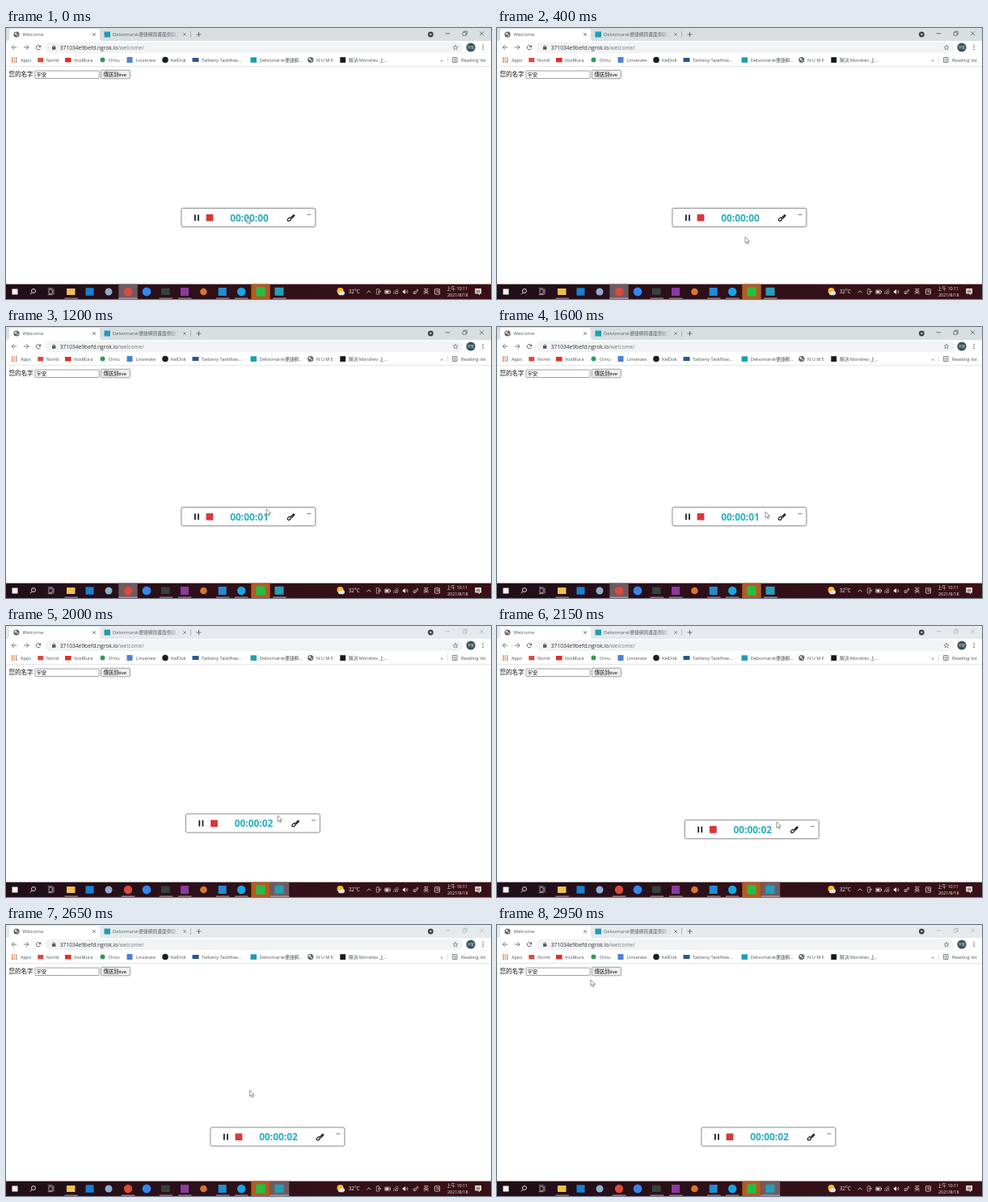
These frames come from a looping animation (600x336 px, 3 s). An HTML page with a canvas:

```html
<!DOCTYPE html>
<html lang="zh-Hant">
<head>
<meta charset="utf-8">
<title>Welcome</title>
<style>
html, body { margin: 0; width: 100%; height: 100%; overflow: hidden; background: #fff; }
canvas { display: block; width: 600px; height: 336px; }
</style>
</head>
<body>
<canvas id="stage"></canvas>
<script>
const W = 600, H = 336, LOOP = 3000, STEP = 50;
const FOCUS_SHIFT = 1750, DRAG_END = 2500;
const UI = '"Open Sans", "Noto Sans CJK TC", "Noto Sans CJK JP", sans-serif';
const CJK = '"Noto Sans CJK TC", "Noto Sans CJK JP", "Noto Sans", sans-serif';
const FORM = '"Liberation Sans", "Noto Sans CJK TC", "Noto Sans CJK JP", sans-serif';

const canvas = document.getElementById('stage');
const dpr = window.devicePixelRatio || 1;
canvas.width = W * dpr;
canvas.height = H * dpr;
const c = canvas.getContext('2d');

// Pointer path: time, x, y
const path = [
  [0, 298, 234.5], [400, 307, 259], [800, 312, 222], [1600, 332, 229],
  [FOCUS_SHIFT, 330.5, 225.5], [2000, 336, 235], [2350, 361, 254.5],
  [DRAG_END, 366.5, 253], [2950, 116, 68]
];

function pointer(t) {
  const i = path.findIndex(p => p[0] >= t);
  if (i < 0) return path[path.length - 1].slice(1);
  if (i === 0) return path[0].slice(1);
  const [t0, x0, y0] = path[i - 1], [t1, x1, y1] = path[i];
  const u = (t - t0) / (t1 - t0), k = u * u * (3 - 2 * u);
  return [x0 + (x1 - x0) * k, y0 + (y1 - y0) * k];
}

function origin(x, y) {
  c.setTransform(dpr, 0, 0, dpr, x * dpr, y * dpr);
}

function box(x, y, w, h, fill) {
  c.fillStyle = fill;
  c.fillRect(x, y, w, h);
}

function outline(color, lw) {
  c.strokeStyle = color;
  c.lineWidth = lw;
  c.stroke();
}

function round(x, y, w, h, r, fill, stroke, lw = 0.6) {
  c.beginPath();
  c.roundRect(x, y, w, h, r);
  if (fill) { c.fillStyle = fill; c.fill(); }
  if (stroke) outline(stroke, lw);
}

function dot(x, y, r, fill) {
  c.beginPath();
  c.arc(x, y, r, 0, 7);
  c.fillStyle = fill;
  c.fill();
}

function ring(x, y, r, color, lw = 0.8, a = 0, b = Math.PI * 2) {
  c.beginPath();
  c.arc(x, y, r, a, b);
  outline(color, lw);
}

function trace(pts) {
  c.beginPath();
  for (let i = 0; i < pts.length; i += 2) c.lineTo(pts[i], pts[i + 1]);
}

function seg(pts, color, lw = 0.8) {
  trace(pts);
  outline(color, lw);
}

function shape(pts, fill) {
  trace(pts);
  c.closePath();
  c.fillStyle = fill;
  c.fill();
}

function text(s, x, y, size, fill, family = UI, weight = 400) {
  c.font = `${weight} ${size}px ${family}`;
  c.fillStyle = fill;
  c.fillText(s, x, y);
}

function cross(x, y, r, color, lw) {
  seg([x - r, y - r, x + r, y + r], color, lw);
  seg([x + r, y - r, x - r, y + r], color, lw);
}

function globe(x, y) {
  dot(x, y, 3.6, '#5f6368');
  shape([x - 2.6, y - 1, x - 0.4, y - 2.5, x + 0.4, y - 0.6, x - 1, y + 0.6], '#fff');
  shape([x + 0.3, y + 0.4, x + 2.5, y, x + 1, y + 2.5], '#fff');
}

function tabs(active) {
  const ctl = active ? '#3c4043' : '#a3a7aa';
  box(0, 0, W, 16, active ? '#d8dfe1' : '#e5eaec');
  c.beginPath();
  c.moveTo(1, 16);
  c.quadraticCurveTo(4, 16, 4, 13);
  c.lineTo(4, 4);
  c.quadraticCurveTo(4, 1, 7, 1);
  c.lineTo(113, 1);
  c.quadraticCurveTo(116, 1, 116, 4);
  c.lineTo(116, 13);
  c.quadraticCurveTo(116, 16, 119, 16);
  c.fillStyle = '#fff';
  c.fill();
  globe(13, 8);
  text('Welcome', 20.5, 10.4, 6, '#55595d');
  cross(109, 8, 1.8, '#4d5156', 0.7);

  box(121.5, 4.5, 7.5, 7, '#1f9db2');
  c.save();
  c.beginPath();
  c.rect(130, 0, 85, 16);
  c.clip();
  const fade = c.createLinearGradient(200, 0, 215, 0);
  fade.addColorStop(0, '#5a6064');
  fade.addColorStop(1, '#5a606400');
  text('Delvomarsk便捷網頁畫面側錄工具', 132, 10.4, 5.8, fade);
  c.restore();
  cross(221, 8, 1.8, '#5f6368', 0.7);
  box(228, 4, 0.6, 8, '#8f9599');
  seg([235.5, 8, 241.5, 8], '#4d5156');
  seg([238.5, 5, 238.5, 11], '#4d5156');

  dot(525.3, 8, 3.4, '#3f4549');
  shape([523.8, 7.2, 526.8, 7.2, 525.3, 9.2], '#fff');
  seg([543.5, 6.8, 549, 6.8], ctl, 0.7);
  round(565, 5.3, 4, 4, 0.3, null, ctl);
  seg([566.5, 5.2, 566.5, 4, 570.3, 4, 570.3, 8, 569, 8], ctl, 0.6);
  cross(588.5, 6.8, 2.4, ctl, 0.7);
}

function toolbar() {
  const ink = '#55595d';
  box(0, 16, W, 32, '#fff');
  seg([13.2, 24, 7.3, 24], ink);
  seg([10, 21.2, 7.2, 24, 10, 26.8], ink);
  seg([22, 24, 28, 24], ink);
  seg([25.2, 21.2, 28, 24, 25.2, 26.8], ink);
  ring(40, 24.2, 2.7, ink, 0.9, 0.4, 5.3);
  shape([43, 20.9, 43, 24, 40, 24], ink);

  round(48.5, 17.6, 517, 13.4, 6.7, '#f1f3f4');
  box(57, 23.2, 4.4, 3.6, ink);
  ring(59.2, 23.1, 1.4, ink, 0.7, Math.PI, 0);
  const host = '371034e9befd.ngrok.io';
  text(host, 66.8, 26.5, 6.65, '#303438');
  text('/welcome/', 66.8 + c.measureText(host).width, 26.5, 6.65, '#777c80');
  const star = [];
  for (let i = 0; i < 10; i++) {
    const r = i % 2 ? 1.4 : 3.2, a = i * Math.PI / 5 - Math.PI / 2;
    star.push(556 + r * Math.cos(a), 24.3 + r * Math.sin(a));
  }
  trace(star);
  c.closePath();
  outline(ink, 0.6);
  dot(575, 24, 5.6, '#37525b');
  text('宇安', 571, 25.6, 4, '#e6eef0', CJK);
  for (const y of [21.6, 24, 26.4]) dot(590, y, 0.75, ink);
}

function bookmarks() {
  const ink = '#4b5054';
  const label = (s, x) => text(s, x, 41.8, 5.65, ink);
  const dots = ['#d94a3d', '#e9823b', '#8a6d55'];
  for (let i = 0; i < 9; i++) box(7 + (i % 3) * 2.5, 36.5 + Math.floor(i / 3) * 2.4, 1.5, 1.5, dots[i % 3]);
  label('Apps', 18);
  box(39.3, 37, 7, 5.4, '#d84b40');
  label('Nomil', 50);
  box(73, 37, 7.6, 5.4, '#e52b25');
  label('VoxMura', 84);
  dot(119.5, 39.5, 3, '#36985a');
  label('Ornu', 127);
  box(149.5, 36, 7, 7, '#4a82d8');
  label('Linverate', 160.8);
  dot(197, 39.5, 3.8, '#1b1f23');
  label('KelDok', 204);
  box(230.5, 37, 8, 5, '#2b568f');
  label('Tarbeny Taskflow...', 242);
  box(302.5, 36.3, 7.5, 6.6, '#1f9db2');
  label('Delvomarsk便捷網...', 313.8);
  globe(376.8, 39.5);
  label('N U M E', 384);
  box(413.3, 36.2, 6.8, 6.8, '#17191b');
  label('解決 Mondrev 上...', 424);
  text('»', 537.5, 41.5, 6, ink);
  box(545.8, 35.5, 0.6, 8, '#c5c9cc');
  round(552.3, 36.5, 5.8, 6, 0.4, null, ink, 0.7);
  for (const y of [38.2, 39.6, 41]) seg([553.5, y, 557, y], ink, 0.5);
  text('Reading list', 563, 41.8, 5.75, ink);
  box(0, 47.3, W, 0.7, '#d9dcde');
}

function page() {
  box(0, 48, W, 270, '#fff');
  text('您的名字', 3.6, 60.4, 7.5, '#161616', CJK);
  round(36, 53.1, 79.2, 9.4, 0.6, '#fff', '#777', 0.7);
  text('宇安', 37.8, 60, 6.2, '#111', FORM);
  round(117.4, 52.3, 36, 10.5, 1.2, '#efefef', '#777', 0.7);
  text('傳送到tive', 120.6, 60, 6.25, '#111', FORM);
}

function recorder(x, y, secs) {
  const ink = '#17191b';
  c.save();
  origin(x, y);
  c.shadowColor = '#0006';
  c.shadowBlur = 2 * dpr;
  round(0.2, 0.7, 165.8, 23, 2, '#fff');
  c.shadowColor = 'transparent';
  round(0.2, 0.7, 165.8, 23, 2, null, '#8d9092', 0.9);
  for (let i = 0; i < 4; i++) box(4.5, 8 + i * 2.4, 0.7, 0.9, '#d0d3d5');
  for (const sx of [50.3, 120.5]) box(sx, 7, 0.5, 11, '#eceeef');
  for (const px of [16.2, 20.3]) box(px, 8.6, 1.7, 7.6, ink);
  round(30.8, 8.1, 8.8, 8.6, 0.5, '#d8383c');
  text('00:00:0' + secs, 60.4, 16.9, 11.9, '#2cafc0', UI, 700);
  seg([135.6, 12.5, 139, 9, 140, 9.8, 136.8, 13.6], ink, 1.3);
  c.beginPath();
  c.ellipse(133.6, 14.5, 2.4, 1.6, -0.75, 0, 7);
  outline(ink, 1.2);
  seg([155.6, 8.6, 160.6, 8.6], '#555a5e', 0.8);
  c.restore();
}

function taskbar(active) {
  const bg = c.createLinearGradient(0, 0, W, 0);
  bg.addColorStop(0, '#200e19');
  bg.addColorStop(0.55, '#321019');
  bg.addColorStop(1, '#391015');
  box(0, 317.6, W, 18.4, bg);
  box(active ? 139.3 : 326.8, 317.6, 23.4, 18.4, '#705a62');
  box(303.3, 317.6, 23.4, 18.4, '#b45a20');

  box(7.5, 323.5, 7, 7, '#f4f4f4');
  ring(34, 326, 2.5, '#f0f0f0', 0.9);
  seg([32.1, 328, 29.8, 330.4], '#f0f0f0', 0.9);
  round(53, 324.2, 4.2, 5.4, 0.2, null, '#ddd', 0.7);
  seg([59, 323.5, 59, 330.4], '#ddd', 0.7);
  for (const y of [322.6, 330.5]) box(51.7, y, 6, 0.6, '#ddd');

  box(75, 323, 10.5, 8, '#f0c04e');
  box(98.5, 322.3, 10, 9.4, '#1780cf');
  dot(127, 327, 4.5, '#8caed0');
  dot(151, 327, 5.2, '#dc4a3c');
  dot(174, 327, 5.4, '#3487ee');
  box(192, 322.5, 10.5, 8.5, '#36423f');
  box(216, 322, 10, 10, '#8b3aa0');
  dot(244.4, 327, 4.3, '#d9762c');
  box(262.7, 322, 10, 10, '#238bd2');
  dot(291.2, 327, 5.2, '#17a6e5');
  box(309.4, 321.3, 11.4, 11.4, '#25bd45');
  box(332.5, 321.8, 11, 10, '#259fb6');

  for (const x of [72.5, 189.6, 213, 260, 283]) box(x, 334.6, 16.5, 1.1, '#b4929b');
  box(active ? 139.3 : 142.8, 334.6, active ? 23.4 : 16.5, 1.1, '#c5a3ab');
  box(active ? 330.2 : 326.8, 334.6, active ? 16.5 : 23.4, 1.1, '#c5a3ab');
}

function tray() {
  const ink = '#eee';
  dot(413.5, 326, 4, '#f7b92d');
  dot(413, 329.2, 2, '#dbe4ed');
  dot(416.4, 328.6, 2.6, '#dbe4ed');
  box(413, 329, 4, 2.2, '#dbe4ed');
  text('32°C', 423.7, 329.4, 6.4, ink);
  seg([446.5, 328.3, 449, 325.8, 451.5, 328.3], ink, 0.8);
  round(458.3, 323.7, 3.4, 6.4, 0.5, null, ink, 0.6);
  seg([460, 327, 464, 327, 462.7, 325.7], ink, 0.6);
  round(468.7, 325, 6.2, 4.3, 0.3, null, ink, 0.6);
  box(469.5, 325.8, 3.8, 2.7, ink);
  box(475, 326.2, 0.8, 1.8, ink);
  for (const r of [2, 4, 6]) ring(485.4, 330, r, r > 4 ? '#aaa0a3' : ink, 0.7, Math.PI, Math.PI * 1.5);
  shape([490.8, 325.8, 492.2, 325.8, 494, 324, 494, 330, 492.2, 328.2, 490.8, 328.2], ink);
  for (const r of [1.5, 3]) ring(494, 327, r, ink, 0.6, -0.9, 0.9);
  seg([504.4, 329.8, 508.8, 324.2, 510, 325.2, 506, 330], ink, 0.7);
  ring(505.5, 328, 1.6, ink, 0.6, 1.5, 5);
  text('英', 516.3, 329.4, 6.8, ink, CJK);
  round(530.5, 323.7, 6, 6.4, 0.4, null, ink, 0.7);
  seg([532, 325.5, 535, 325.5, 535, 328.5], ink, 0.6);
  seg([532, 327.3, 535, 327.3], ink, 0.6);
  text('上午 10:11', 545.2, 325, 5.4, ink);
  text('2021/8/18', 546, 333.1, 5.4, ink);
  shape([580.3, 323, 588, 323, 588, 329.6, 586, 329.6, 586, 331.4, 584.2, 329.6, 580.3, 329.6], ink);
  for (const y of [324.7, 326.2, 327.7]) box(581.6, y, 5, 0.6, '#39151b');
}

function cursor(x, y) {
  c.save();
  origin(x, y);
  shape([0, 0, 0, 7.6, 1.8, 6, 3, 8.7, 4.2, 8.2, 3, 5.5, 5.5, 5.4], '#fff');
  outline('#4a4d50', 0.6);
  c.restore();
}

function draw(t) {
  const active = t < FOCUS_SHIFT;
  const [x, y] = pointer(t);
  const [gx, gy] = pointer(Math.min(Math.max(t, FOCUS_SHIFT), DRAG_END));
  origin(0, 0);
  tabs(active);
  toolbar();
  bookmarks();
  page();
  taskbar(active);
  tray();
  recorder(gx - 113.7, gy - 2.7, Math.floor(t / 1000));
  cursor(x, y);
}

const start = performance.now();
function tick() {
  const t = (performance.now() - start) % LOOP;
  draw(Math.floor(t / STEP) * STEP);
  requestAnimationFrame(tick);
}
tick();
</script>
</body>
</html>
```
